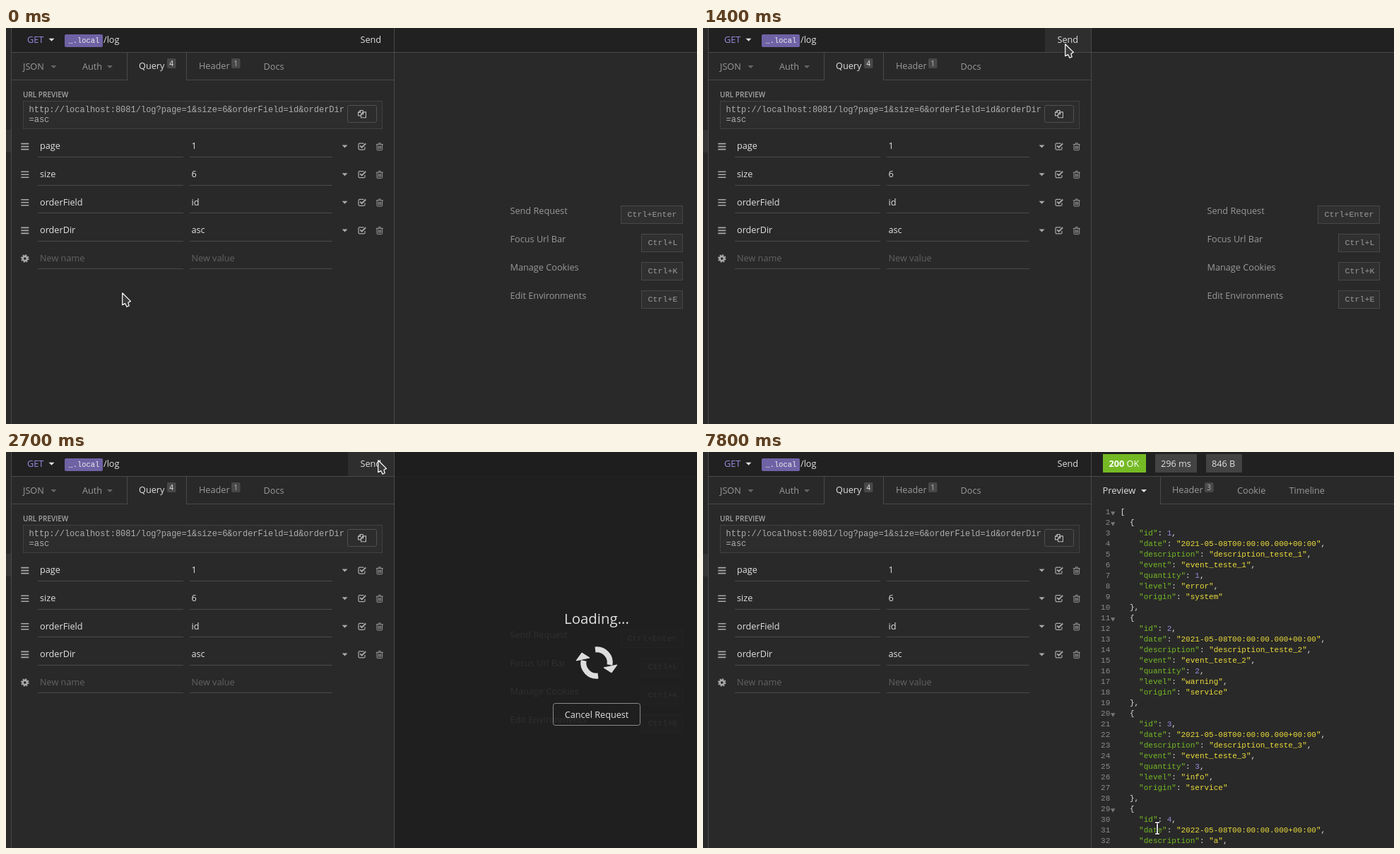
An HTML page for the animation above (8000 ms loop, 978x560 px).

```html
<!DOCTYPE html>
<html lang="en">
<head>
<meta charset="utf-8">
<title>API client request</title>
<style>
  html, body { margin: 0; width: 100%; height: 100%; overflow: hidden; background: #292929; }
  svg { display: block; width: 978px; height: 560px; }
  text { font: 12.7px "Open Sans", "Noto Sans", sans-serif; fill: #e0e0e0; }
  .mono { font-family: "Liberation Mono", "DejaVu Sans Mono", monospace; }
  .code { font-size: 11px; }
</style>
</head>
<body>
<svg id="stage" viewBox="0 0 978 560" xmlns="http://www.w3.org/2000/svg"></svg>
<script>
const LOOP = 8000, STEP = 100;
const SENT = 2400, LOADED = 2700, DONE = 5800, FOLDS = 6200;
const FG = '#e0e0e0', DIM = '#999', FAINT = '#666', LINE = '#4a4a4a', BAR = '#212121';
const PURPLE = '#9a8be0', GREEN = '#75ba24', YELLOW = '#ecdc3a';

const esc = s => String(s).replace(/&/g, '&amp;').replace(/</g, '&lt;');
const text = (x, y, s, fill = FG, attrs = '') =>
  `<text x="${x}" y="${y}" style="fill:${fill};${attrs}">${esc(s)}</text>`;
const mono = (x, y, s, size, fill, attrs = '') =>
  `<text class="mono" x="${x}" y="${y}" style="font-size:${size}px;fill:${fill};${attrs}">${esc(s)}</text>`;
const rect = (x, y, w, h, fill, attrs = '') =>
  `<rect x="${x}" y="${y}" width="${w}" height="${h}" fill="${fill}" ${attrs}/>`;
const path = (d, attrs) => `<path d="${d}" ${attrs}/>`;
const hline = (x1, x2, y) => rect(x1, y, x2 - x1, 1, LINE);
const vline = (x, y1, y2) => rect(x, y1, 1, y2 - y1, LINE);
const at = (x, y, body) => `<g transform="translate(${x} ${y})">${body}</g>`;
const group = (id, body) => `<g id="${id}">${body}</g>`;
const caret = (x, y, fill) => path(`M${x - 4} ${y - 2}h8l-4 4z`, `fill="${fill}"`);
const badge = (x, n, fill) =>
  rect(x, 43, 12.5, 14, '#484848', 'rx="2"') +
  text(x + 6.2, 53.7, n, fill, 'font-size:10px;text-anchor:middle');

const stroke = (color, w = 1.2) => `fill="none" stroke="${color}" stroke-width="${w}"`;
const icons = {
  bars: path('M-5.5-4h11M-5.5 0h11M-5.5 4h11', stroke('#aaa', 1.6)),
  check: path('M4.2 1v2.3q0 1.5-1.5 1.5h-6q-1.5 0-1.5-1.5v-6q0-1.5 1.5-1.5h6', stroke('#aaa')) +
    path('M-2.6-.8l2.4 2.4 5.6-5.6', stroke('#aaa', 1.9)),
  trash: path('M-5-3h10M-1.8-3.2l.6-1.7h2.4l.6 1.7M-3.8-3v7.2q0 1 1 1h5.6q1 0 1-1v-7.2M-1.7-1v4.5M0-1v4.5M1.7-1v4.5',
    stroke('#999', 1)),
  gear: `<circle r="3.1" ${stroke('#aaa', 2.6)}/><circle r="4.8" ${stroke('#aaa', 2)} stroke-dasharray="1.9 1.87"/>`,
  copy: path('M-1.8 2.4h-3.7v-4.4l3-3h3.6v2.4M-2.4-5v3h-3M-1.5 5.3v-5l2.9-2.9h4v7.9zM1.6-2.5v3h-3', stroke('#bbb', 1.1))
};

function requestPane() {
  let out = rect(0, 0, 978, 560, '#292929') + rect(0, 144, 7, 32, '#353535') +
    rect(8, 0, 970, 34, BAR) +
    group('hover', rect(484, 0, 65, 34, '#2e2e2e')) +
    vline(7, 0, 560) + vline(549, 0, 560) + hline(8, 978, 34) +
    text(30, 21, 'GET', PURPLE) + caret(64.5, 16.7, FG) +
    rect(83, 9, 54, 18, '#6f62a5', 'rx="2"') + mono(88.5, 21, '_.local', 10.4, '#eee') +
    text(138, 21, '/log') + text(501.5, 21, 'Send');

  out += hline(8, 172, 73) + hline(255, 549, 73) + vline(171, 35, 73) + vline(255, 35, 73) +
    text(24, 59, 'JSON', DIM) + caret(67.5, 55, FAINT) +
    text(108, 59, 'Auth', DIM) + caret(147, 55, FAINT) +
    text(188, 58, 'Query') + badge(228, 4, '#eee') +
    text(273, 58, 'Header', DIM) + badge(319, 1, '#bbb') +
    text(364.5, 59, 'Docs', DIM);

  out += text(24, 97.5, 'URL PREVIEW', '#a5a5a5', 'font-size:10px;font-weight:600') +
    rect(24.5, 103.5, 508, 39, '#2d2d2d', 'stroke="#414141"') +
    mono(32.5, 119, 'http://localhost:8081/log?page=1&size=6&orderField=id&orderDir', 12, '#adadad') +
    mono(32.5, 133, '=asc', 12, '#adadad') +
    rect(483.5, 109.5, 41, 24, 'none', 'stroke="#505050" rx="2"') + at(504, 121.5, icons.copy);

  const rows = [['page', '1'], ['size', '6'], ['orderField', 'id'], ['orderDir', 'asc'], ['New name', 'New value']];
  rows.forEach(([name, value], i) => {
    const y = 167.3 + i * 39.6, last = i === rows.length - 1, fill = last ? '#636363' : FG;
    const under = Math.round(y + 14.6);
    out += text(48, y + 4, name, fill) + text(262.5, y + 4, value, fill) +
      hline(45, 251, under) + hline(260, 462, under) +
      at(26.8, y + .3, last ? icons.gear : icons.bars);
    if (!last) out += caret(479.5, y + .3, '#aaa') + at(503.8, y, icons.check) + at(528.8, y + .3, icons.trash);
  });
  return out;
}

function idlePane() {
  const keys = [['Send Request', 'Ctrl+Enter'], ['Focus Url Bar', 'Ctrl+L'],
    ['Manage Cookies', 'Ctrl+K'], ['Edit Environments', 'Ctrl+E']];
  return keys.map(([label, key], i) => {
    const y = 251 + i * 40, w = key.length > 6 ? 87 : 58;
    return text(713.5, y + 12, label, DIM) +
      rect(957.5 - w, y + .5, w, 25, '#303030', 'stroke="#484848"') +
      mono(966.5 - w, y + 16, key, 11.7, '#999');
  }).join('');
}

function loadingPane() {
  const half = path('M-2-18.5A18.5 18.5 0 0 1 18.5 3', stroke('#ddd', 8)) +
    path('M29 3L10 7 21 14z', 'fill="#ddd" stroke="#ddd" stroke-linejoin="round"');
  return rect(550, 0, 428, 560, '#1e1e1e', 'opacity=".86"') +
    text(836, 243, 'Loading...', FG, 'font-size:20.4px;text-anchor:middle') +
    at(836, 298, group('spin', half + `<g transform="rotate(180)">${half}</g>`)) +
    rect(774.5, 355.5, 123, 31, 'none', 'stroke="#8a8a8a" rx="3"') +
    text(836, 376, 'Cancel Request', FG, 'text-anchor:middle');
}

// Builds lines as [indent, key, value, tail].
function jsonLines() {
  const levels = ['error', 'warning', 'info', 'info'], lines = [[0, '', '', '[']];
  for (let n = 1; n <= 4; n++) {
    const fields = {
      id: n,
      date: `${n < 4 ? 2021 : 2022}-05-08T00:00:00.000+00:00`,
      description: n < 4 ? 'description_teste_' + n : 'a',
      event: 'event_teste_' + n,
      quantity: n,
      level: levels[n - 1],
      origin: n === 1 ? 'system' : 'service'
    };
    lines.push([2, '', '', '{']);
    for (const k in fields) lines.push([4, k, JSON.stringify(fields[k]), k === 'origin' ? '' : ',']);
    lines.push([2, '', '', '},']);
  }
  return lines.slice(0, 32);
}

function responsePane() {
  const span = (s, fill) => `<tspan fill="${fill}">${s}</tspan>`;
  let out = rect(550, 35, 428, 525, '#292929') + hline(550, 978, 34) +
    rect(566, 3, 61, 26, GREEN) +
    text(574.5, 21, '200', '#fff', 'font-weight:700') + text(599.5, 21, 'OK', '#fff') +
    rect(640, 3, 59, 26, '#434343') + text(648, 21, '296 ms') +
    rect(712, 3, 51, 26, '#434343') + text(720, 21, '846 B') +
    vline(647, 35, 73) + hline(647, 978, 73) +
    text(565.5, 59, 'Preview', FG, 'font-size:13px') + caret(624, 55, FG) +
    text(664, 58, 'Header', DIM) + badge(710, 3, '#bbb') +
    text(756, 59, 'Cookie', DIM) + text(829.5, 59, 'Timeline', DIM);
  let folds = '';
  jsonLines().forEach(([indent, key, value, tail], i) => {
    const y = 88.3 + i * 15;
    const body = key
      ? span(`"${key}"`, GREEN) + ': ' + span(value, value[0] === '"' ? YELLOW : PURPLE) + tail
      : tail;
    out += mono(576.3, y, i + 1, 11, '#8a8a8a', 'text-anchor:end') +
      `<text class="mono code" x="${590.7 + indent * 6.6}" y="${y}">${body}</text>`;
    if (tail === '[' || tail === '{') folds += path(`M577 ${y - 4}h6.4l-3.2 5.4z`, 'fill="#777"');
  });
  return out + group('folds', folds);
}

const pointer = group('arrow', path('M.7 .8V17.6L4.6 15.6 7 20.3 10.2 18.8 8.9 14.2 12.4 12.4z',
    'fill="#3b3b3b" stroke="#fff" stroke-width="1.2" stroke-linejoin="round"')) +
  group('beam', ['#111', '#fff'].map((c, i) =>
    path('M-3-8h2.2L0-7.2.8-8H3M-3 8h2.2L0 7.2.8 8H3M0-7.2V7.2', stroke(c, i ? 1.7 : 3.6))).join(''));

document.getElementById('stage').innerHTML = requestPane() + group('idle', idlePane()) +
  group('loading', loadingPane()) + group('response', responsePane()) + group('pointer', pointer);

// time, x, y, 1 = text cursor
const moves = [
  [0, 164, 374, 0], [600, 164, 372, 0], [800, 190, 345, 0], [900, 246, 287, 1],
  [1000, 323, 203, 1], [1100, 398, 131, 1], [1200, 452, 80, 0], [1300, 490, 44, 0],
  [1400, 512, 22, 0], [1500, 522, 12, 0], [1600, 526, 8, 0], [1800, 526, 9, 0],
  [1900, 526, 10, 0], [2400, 526, 11, 0], [5800, 421, 264.5, 1], [6200, 628.5, 136, 1],
  [6500, 685, 121, 1], [6900, 664, 374, 1], [7100, 645, 524, 1], [7400, 645, 532, 1],
  [7800, 643, 532, 1]
];

const el = id => document.getElementById(id);
const show = (id, on) => el(id).setAttribute('visibility', on ? 'inherit' : 'hidden');

function draw(ms) {
  const t = Math.floor(ms / STEP) * STEP;
  const [, x, y, beam] = moves.filter(m => m[0] <= t).pop();
  el('pointer').setAttribute('transform', `translate(${x} ${y})`);
  show('arrow', !beam);
  show('beam', beam);
  show('hover', x > 484 && y < 34);
  show('idle', t < DONE);
  show('loading', t >= SENT && t < DONE);
  show('response', t >= DONE);
  show('folds', t >= FOLDS);
  el('loading').setAttribute('opacity', Math.min(1, (t - SENT + STEP) / (LOADED - SENT + STEP)));
  el('spin').setAttribute('transform', `rotate(${(Math.min(t, LOADED) - LOADED) * .18})`);
}

// A hidden parent must also hide the folds.
function frame() {
  draw(performance.now() % LOOP);
  requestAnimationFrame(frame);
}
frame();
</script>
</body>
</html>
```
